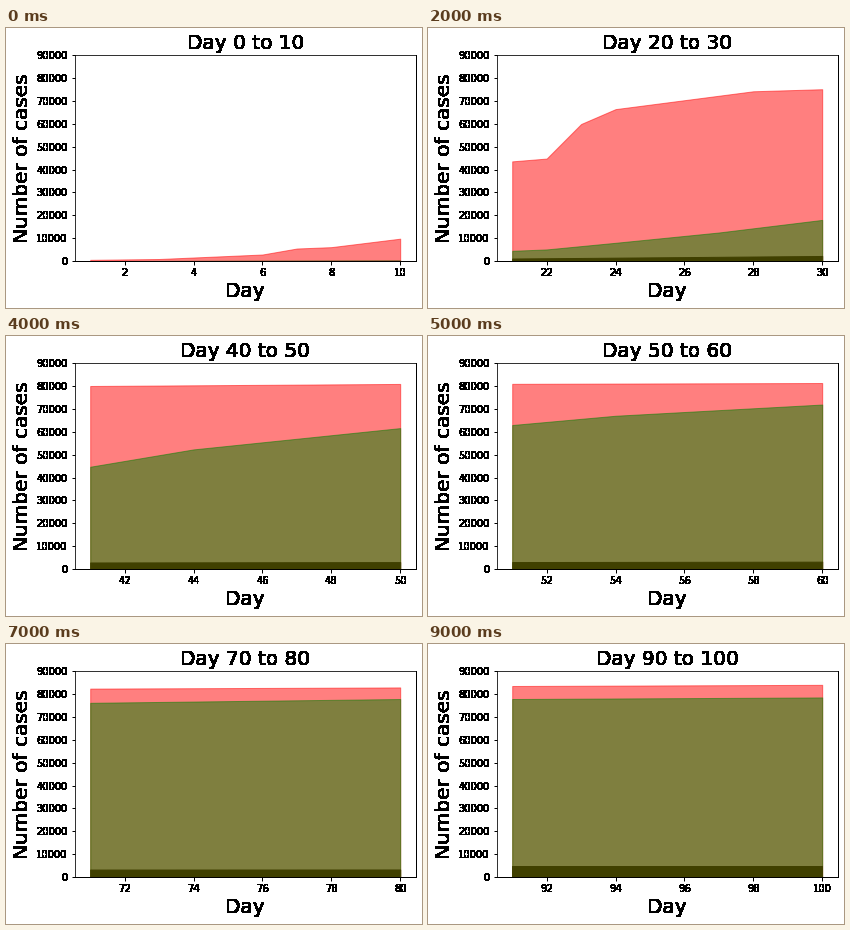
Animation, 416 px wide and 280 px high, one loop 10000 ms. Source, as a matplotlib script:

```python
import numpy as np
import matplotlib.pyplot as plt
from matplotlib.animation import FuncAnimation

W, H, DPI = 416, 280, 72
SPAN = 10                      # days per window
DAYS = np.arange(1, 101)

plt.rcParams.update({"font.family": "DejaVu Sans", "font.size": 10})


def curve(*keys):
    """One value per day, from (day, thousands) key points joined by lines."""
    x, y = zip(*keys)
    return 1000 * np.interp(DAYS, x, y)


cases = curve((1, 0.55), (3, 0.92), (6, 2.88), (7, 5.5), (8, 6.1), (10, 9.8),
              (11, 11.9), (12, 16.6), (13, 19.7), (15, 27.4), (17, 34.1),
              (20, 42.35), (22, 44.8), (23, 59.9), (24, 66.4), (28, 74.2),
              (30, 75.1), (32, 77), (34, 77.2), (40, 79.9), (50, 80.9),
              (60, 81.3), (70, 82.3), (100, 84))

recovered = curve((1, 0.03), (10, 0.2), (15, 1.1), (20, 3.9), (22, 5.1),
                  (24, 8), (27, 12.5), (30, 18), (31, 18.7), (32, 22.7),
                  (33, 23.2), (34, 25), (37, 32.9), (40, 42.2), (44, 52.3),
                  (50, 61.6), (54, 67), (60, 71.9), (68, 75.6), (80, 77.8),
                  (86, 78.4), (87, 77.5), (100, 78.5))

deaths = curve((1, 0.02), (10, 0.2), (20, 1), (30, 2.24), (40, 2.87),
               (60, 3.25), (86, 3.35), (87, 4.64), (100, 4.64))

LAYERS = [(cases, "red", 0.5), (recovered, "green", 0.5),
          (deaths, "#404000", 1)]

fig = plt.figure(figsize=(W / DPI, H / DPI), dpi=DPI, facecolor="white")
ax = fig.add_axes([68.7 / W, 46.9 / H, 341 / W, 206 / H])


def harden(img, dpi):
    """Turn soft glyph edges into solid black."""
    out = np.zeros_like(img)
    out[..., 3] = img[..., 3] > 0
    return out, 0, 0


def draw(i):
    ax.clear()
    first = i * SPAN
    window = slice(first, first + SPAN)
    x = DAYS[window]
    for values, color, alpha in LAYERS:
        ax.fill_between(x, values[window], color=color, alpha=alpha)

    pad = 0.05 * (SPAN - 1)
    ax.set_xlim(x[0] - pad, x[-1] + pad)
    ax.set_ylim(0, 90000)
    ax.set_xticks(range(first + 2, first + SPAN + 1, 2))
    ax.set_yticks(range(0, 90001, 10000))
    ax.tick_params(width=1)
    ax.spines[["right", "bottom"]].set_linewidth(1)

    texts = [ax.set_title(f"Day {first} to {first + SPAN}", fontsize=20),
             ax.set_xlabel("Day", fontsize=20),
             ax.set_ylabel("Number of cases", fontsize=20)]
    for text in texts + ax.get_xticklabels() + ax.get_yticklabels():
        text.set_agg_filter(harden)
    return []


anim = FuncAnimation(fig, draw, frames=len(DAYS) // SPAN, interval=1000,
                     init_func=lambda: draw(0), repeat=True, repeat_delay=0)
plt.show()
```
